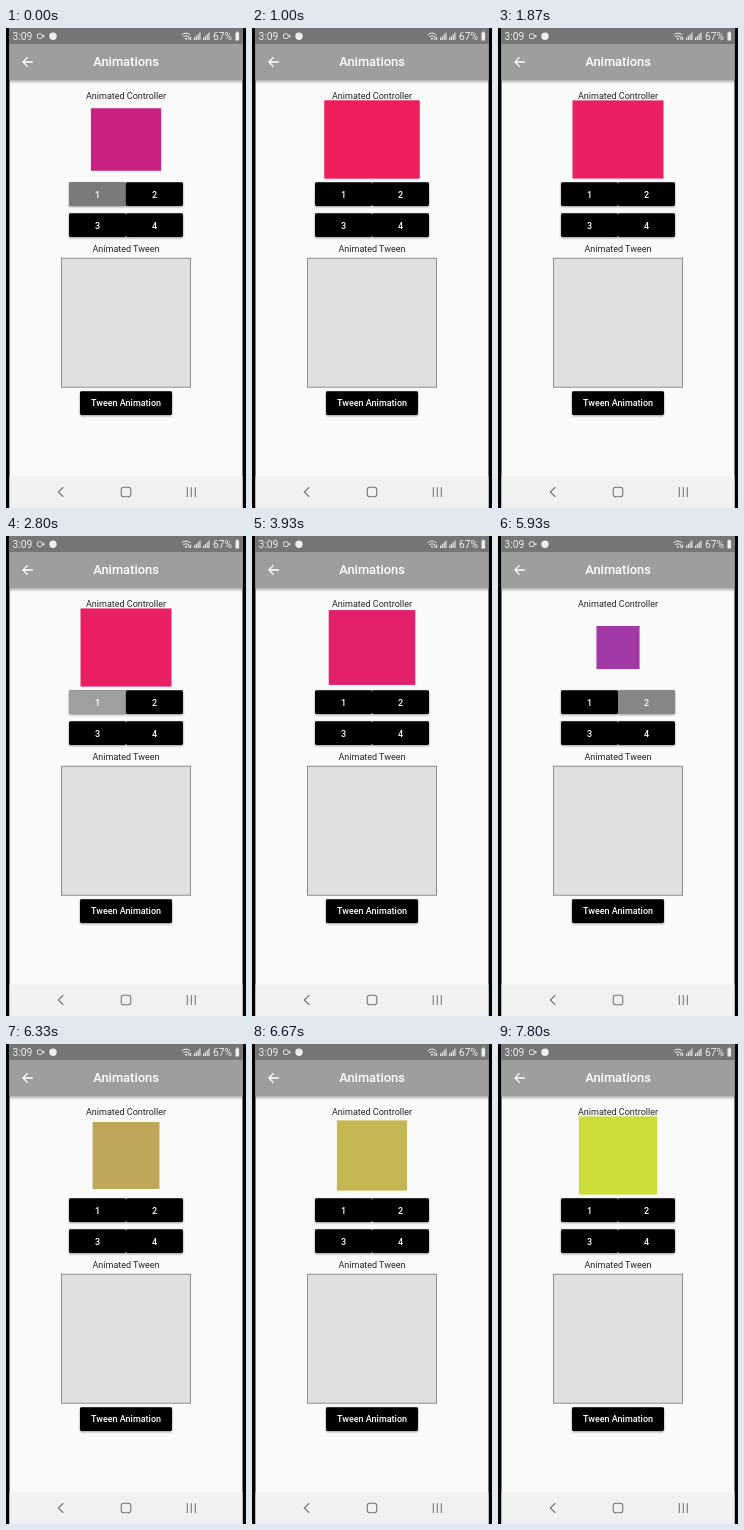
Recreate the animation shown at these times as an HTML page. Size 240 by 480 pixels, loop 8 s.

```html
<!DOCTYPE html>
<html lang="en">
<head>
<meta charset="utf-8">
<title>Animations</title>
<style>
  html, body { margin: 0; width: 100%; height: 100%; overflow: hidden; background: #000; }
  svg { display: block; width: 240px; height: 480px; }
  text { font-family: Roboto, Arial, sans-serif; font-size: 9px; }
  .mid { text-anchor: middle; }
  .label { fill: #222; text-anchor: middle; }
  .button { fill: #fff; font-weight: 500; text-anchor: middle; }
  .line { fill: none; stroke-linecap: round; stroke-linejoin: round; }
</style>
</head>
<body>
<svg viewBox="0 0 240 480">
  <defs>
    <linearGradient id="shade" x2="0" y2="1">
      <stop offset="0" stop-color="#000" stop-opacity=".3"/>
      <stop offset="1" stop-color="#000" stop-opacity="0"/>
    </linearGradient>
    <filter id="lift" x="-10%" y="-20%" width="120%" height="150%">
      <feDropShadow dx="0" dy="1" stdDeviation=".8" flood-opacity=".4"/>
    </filter>
  </defs>

  <rect width="240" height="480" fill="#000"/>
  <rect x="3.5" width="233" height="480" fill="#fafafa"/>
  <rect x="3.5" y="52" width="233" height="4" fill="url(#shade)"/>
  <rect x="3.5" y="16" width="233" height="36" fill="#9e9e9e"/>
  <rect x="3.5" width="233" height="16" fill="#757575"/>
  <rect x="3.5" y="448.5" width="233" height="31.5" fill="#f1f1f1"/>

  <!-- status bar -->
  <g fill="#eee">
    <text x="6.5" y="12.2" style="font-size:10.3px">3:09</text>
    <rect x="31.5" y="5.9" width="4.6" height="4.6" rx="1" fill="none" stroke="#eee" stroke-width=".9"/>
    <path d="M36.3 8.2l2-1.6v3.2z"/>
    <circle cx="47" cy="8.2" r="3.7"/>
    <g class="line" stroke="#eee" stroke-width="1">
      <path d="M176 6.7q4-3.6 8 0M177.5 8.6q2.5-2.2 5 0"/>
    </g>
    <circle cx="180" cy="10.7" r="1"/>
    <path d="M182.4 12v-3.2h1v3.2zM184.2 12v-3.2h1v3.2z"/>
    <path id="bars" d="M188 12V9.6h1.1V12zM189.8 12V8h1.1v4zM191.6 12V6.3h1.1V12zM193.4 12V4.6h1.1V12z"/>
    <use href="#bars" x="9"/>
    <text x="207" y="12.2" style="font-size:10.2px">67%</text>
    <path d="M229.5 4.6h1v-1h1.6v1h1V12.4h-3.6z"/>
  </g>

  <!-- app bar -->
  <path class="line" d="M26.3 34H17M21.3 29.6L17 34l4.3 4.4" stroke="#fff" stroke-width="1.3"/>
  <text class="mid" x="120" y="38.3" fill="#fff" style="font-size:12.9px;font-weight:500">Animations</text>

  <text class="label" x="120" y="71">Animated Controller</text>
  <rect id="box"/>
  <g id="buttons"></g>
  <text class="label" x="120" y="224.3">Animated Tween</text>
  <rect x="55.4" y="230.2" width="129.2" height="129" fill="#e0e0e0" stroke="#777" stroke-width=".8"/>

  <!-- navigation -->
  <g class="line" stroke="#777" stroke-width="1.1">
    <path d="M57 459.5L52.3 464l4.7 4.5"/>
    <rect x="115.2" y="459.2" width="9.6" height="9.6" rx="2.6"/>
    <path d="M181.3 459.6v8.8M185.3 459.6v8.8M189.3 459.6v8.8"/>
  </g>
</svg>
<script>
const LOOP = 8000, DURATION = 2090;
const CENTER = { x: 120, y: 111.5 }, MAX_HEIGHT = 78.4;

const rest  = { w: 39.2, h: 39.2, rgb: [156, 39, 176] };
const pink  = { w: 91, h: 78.2, rgb: [233, 30, 99] };
const lime  = { w: 78.2, h: 78.2, rgb: [205, 220, 57] };

const svgNS = 'http://www.w3.org/2000/svg';
const clamp = (v, lo = 0, hi = 1) => Math.min(hi, Math.max(lo, v));
const lerp = (a, b, t) => a + (b - a) * t;

function cubic(x1, y1, x2, y2) {
  const at = (a, b, s) => 3 * (1 - s) ** 2 * s * a + 3 * (1 - s) * s * s * b + s ** 3;
  return x => {
    if (x <= 0 || x >= 1) return clamp(x);
    let lo = 0, hi = 1;
    for (let i = 0; i < 24; i++) {
      const s = (lo + hi) / 2;
      if (at(x1, x2, s) < x) lo = s; else hi = s;
    }
    return at(y1, y2, lo);
  };
}

const easeOutBack = cubic(.175, .885, .32, 1.275);
const easeOutCirc = cubic(.075, .82, .165, 1);

function bounceOut(t) {
  const k = 7.5625, d = 2.75;
  if (t < 1 / d) return k * t * t;
  if (t < 2 / d) return k * (t - 1.5 / d) ** 2 + .75;
  if (t < 2.5 / d) return k * (t - 2.25 / d) ** 2 + .9375;
  return k * (t - 2.625 / d) ** 2 + .984375;
}

const runs = [
  { start: -300, goal: pink, curve: easeOutBack },
  { start: 2605, goal: pink, curve: t => easeOutCirc(1 - t) },
  { start: 5690, goal: lime, curve: bounceOut },
];
const taps = [
  { button: 0, time: -300 },
  { button: 0, time: 2590 },
  { button: 1, time: 5660 },
];

function make(parent, tag, attrs) {
  const el = document.createElementNS(svgNS, tag);
  for (const k in attrs) el.setAttribute(k, attrs[k]);
  return parent.appendChild(el);
}

// Returns the light overlay used for the tap flash.
function addButton(label, x, y, width) {
  const group = document.getElementById('buttons');
  const shape = { x, y, width, height: 23.7, rx: 1.4 };
  make(group, 'rect', { ...shape, fill: '#000', filter: 'url(#lift)' });
  const glow = make(group, 'rect', { ...shape, fill: '#fff', opacity: 0 });
  make(group, 'text', { x: x + width / 2, y: y + 15.2, class: 'button' }).textContent = label;
  return glow;
}

const glows = ['1', '2', '3', '4'].map((label, i) =>
  addButton(label, i % 2 ? 120 : 63, i < 2 ? 154.3 : 185.3, 57));
addButton('Tween Animation', 74, 363.2, 92);

const box = document.getElementById('box');

function drawBox(time) {
  const run = runs.filter(r => r.start <= time).pop();
  const v = run.curve(clamp((time - run.start) / DURATION));
  const w = lerp(rest.w, run.goal.w, v);
  const h = Math.min(MAX_HEIGHT, lerp(rest.h, run.goal.h, v));
  const rgb = rest.rgb.map((c, i) => Math.round(clamp(lerp(c, run.goal.rgb[i], v), 0, 255)));
  box.setAttribute('x', CENTER.x - w / 2);
  box.setAttribute('y', CENTER.y - h / 2);
  box.setAttribute('width', w);
  box.setAttribute('height', h);
  box.setAttribute('fill', `rgb(${rgb})`);
}

function flash(age) {
  if (age < 0) return 0;
  return .64 * Math.min(clamp(age / 120), clamp((600 - age) / 400));
}

function draw(time) {
  drawBox(time);
  glows.forEach((glow, i) => {
    const levels = taps.filter(t => t.button === i).map(t => flash(time - t.time));
    glow.setAttribute('opacity', Math.max(0, ...levels));
  });
}

const began = performance.now();
function tick() {
  draw((performance.now() - began) % LOOP);
  requestAnimationFrame(tick);
}
draw(0);
requestAnimationFrame(tick);
</script>
</body>
</html>
```
